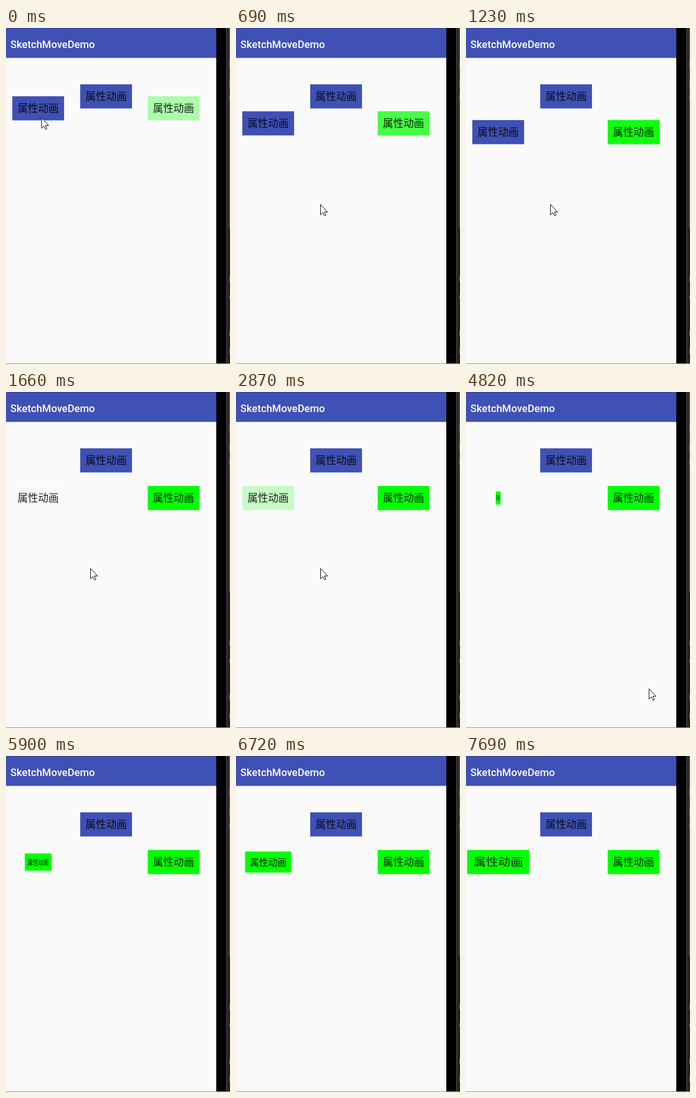
Write an HTML page that moves like this. It is 359 px wide and 536 px high and loops after 8.36 s.

```html
<!DOCTYPE html>
<html lang="zh">
<head>
<meta charset="utf-8">
<title>SketchMoveDemo</title>
<style>
html, body { margin: 0; width: 100%; height: 100%; overflow: hidden; background: #fafafa; }
svg { display: block; }
.title { font: 500 16.6px Roboto, sans-serif; fill: #fff; }
.label { font: 16.5px "Noto Sans CJK SC", "Noto Sans CJK", sans-serif; fill: rgba(0, 0, 0, .87); }
</style>
</head>
<body>
<svg width="359" height="536" viewBox="0 0 359 536">
  <rect width="359" height="536" fill="#fafafa"/>
  <rect width="337" height="47.7" fill="#3f51b5"/>
  <rect width="337" height="1" fill="#303f9f"/>
  <text class="title" x="7" y="31.5">SketchMoveDemo</text>
  <g id="buttons"></g>
  <path id="cursor" d="M0 0V16.5L3.8 13L6.4 18.3L8.6 17.3L6.2 12H11.3Z" fill="#fff" stroke="#000" stroke-width=".9"/>
  <rect x="337" width="22" height="536" fill="#000"/>
  <rect x="353" width="6" height="536" fill="#222"/>
  <rect x="353" width="1.5" height="536" fill="#444"/>
  <rect x="357" width="2" height="320" fill="#484848"/>
  <path d="M358.5 53v10M358.5 82v12M358.5 106v10M358.5 397v7M358.5 426v6M358.5 483v9M358.5 512v8" stroke="#4b8795"/>
  <rect y="535" width="359" height="1" fill="#999"/>
</svg>
<script>
const LOOP = 8360, STEP = 137.7, LEAD = 45;
const W = 83, H = 38.5, TOP = 109.1, BLUE = '#3f51b5';
const SLIDE_END = 1640, GROW_START = 4100, GROW_MID = 6740, GROW_END = 7700;
const NS = 'http://www.w3.org/2000/svg';

const phase = (t, from, to) => Math.min(1, Math.max(0, (t - from) / (to - from)));
const ease = x => (1 - Math.cos(Math.PI * x)) / 2;

// Page background blended into pure green
function greenMix(f) {
  const c = Math.round(250 * (1 - f));
  return `rgb(${c},${Math.round(250 + 5 * f)},${c})`;
}

function add(parent, name, attrs) {
  const el = parent.appendChild(document.createElementNS(NS, name));
  for (const k in attrs) el.setAttribute(k, attrs[k]);
  return el;
}

// Button drawn around its own centre; returns its update function
function makeButton(x) {
  const g = add(document.getElementById('buttons'), 'g');
  const box = add(g, 'rect', { x: -W / 2, y: -H / 2, width: W, height: H });
  add(g, 'text', { class: 'label', x: -33, y: 6.2 }).textContent = '属性动画';
  return (y, fill, sx = 1, sy = 1) => {
    g.setAttribute('transform', `translate(${x} ${y}) scale(${sx} ${sy})`);
    box.setAttribute('fill', fill);
  };
}

const left = makeButton(51.6), middle = makeButton(160.4), right = makeButton(268.6);
const cursor = document.getElementById('cursor');
middle(TOP, BLUE);

function draw(time) {
  // The screen refreshes in even steps
  const t = Math.floor((time + LEAD) / STEP) * STEP;

  const moved = ease(.381 + .619 * phase(t, 0, SLIDE_END));
  const y = TOP + Math.round(60 * moved);
  right(y, greenMix(moved));

  if (t < SLIDE_END) left(y, BLUE);
  else if (t < GROW_START) left(y, greenMix(ease(phase(t, 2170, 4560))));
  else {
    const size = ease(.66 * phase(t, GROW_START, GROW_MID) + .34 * phase(t, GROW_MID, GROW_END));
    left(y, greenMix(1), 1.2 * size, .5 + .5 * size);
  }

  const away = phase(t, 100, 600), exit = phase(t, 4200, 4920);
  const cx = 57 + 78.5 * away + 183.5 * exit;
  const cy = 143.5 + 138 * away + 223 * exit;
  cursor.setAttribute('transform', `translate(${cx} ${cy})`);
  cursor.setAttribute('visibility', t < 5000 ? 'visible' : 'hidden');
}

const start = performance.now();
function loop() {
  draw((performance.now() - start) % LOOP);
  requestAnimationFrame(loop);
}
loop();
</script>
</body>
</html>
```
